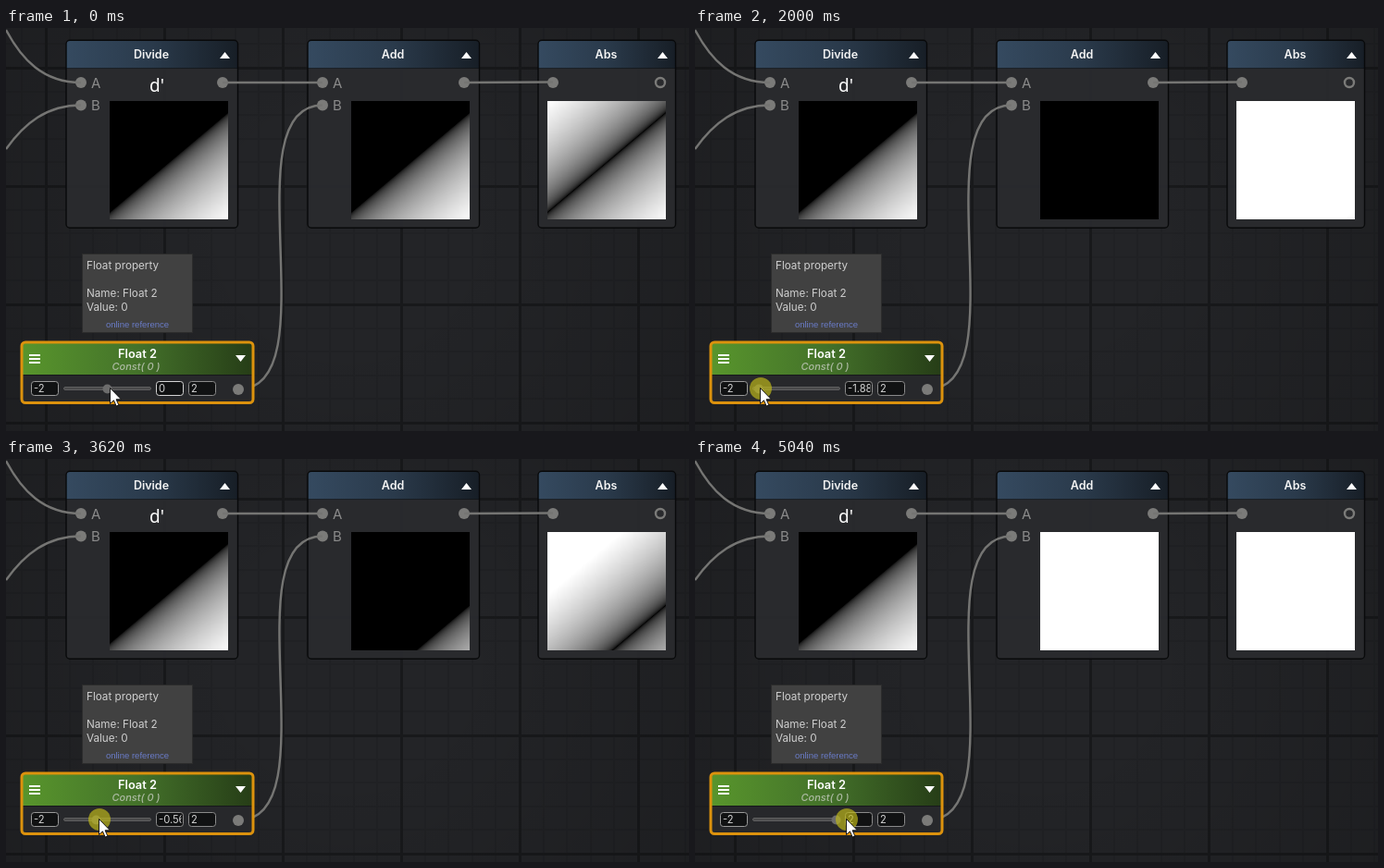
Write an HTML page with a canvas that moves like this. It is 738 by 436 pixels and loops after 5200 ms.

```html
<!DOCTYPE html>
<html lang="en">
<head>
<meta charset="utf-8">
<title>Node graph slider</title>
<style>
html, body { margin: 0; width: 100%; height: 100%; overflow: hidden; background: #202124; }
canvas { display: block; }
</style>
</head>
<body>
<canvas id="stage" width="738" height="436"></canvas>
<script>
const W = 738, H = 436, LOOP = 5200, SIZE = 128;
const ctx = document.getElementById('stage').getContext('2d');
const SANS = 'Inter, sans-serif';
const TITLE = '600 12.5px ' + SANS;
const GREY = '#7b7b79';

// Pointer path: [time, x]
const PATH = [
  [0, 113], [750, 113], [1150, 100], [1300, 93], [1840, 71.5], [1970, 71.5],
  [2000, 71], [2170, 64], [2300, 64], [2510, 59], [2800, 59], [3330, 88],
  [3620, 100.5], [3880, 110], [4140, 131], [4430, 149], [4800, 163],
  [5039, 163], [5040, 164]
];

function pointerAt(t) {
  const i = PATH.findIndex(p => p[0] > t);
  if (i < 0) return PATH[PATH.length - 1][1];
  const [t0, x0] = PATH[i - 1], [t1, x1] = PATH[i];
  return x0 + (x1 - x0) * (t - t0) / (t1 - t0);
}

// The slider moves in steps of 0.04 between -2 and 2.
function valueAt(x) {
  const v = Math.round((x - 112.6) / 22 / 0.04) * 0.04;
  return Math.max(-2, Math.min(2, v));
}

function roundBox(x, y, w, h, r, fill, stroke, line = 1, c = ctx) {
  c.beginPath();
  c.roundRect(x, y, w, h, r);
  if (fill) { c.fillStyle = fill; c.fill(); }
  if (stroke) { c.strokeStyle = stroke; c.lineWidth = line; c.stroke(); }
}

function text(str, x, y, font, color, align = 'left', c = ctx) {
  c.font = font;
  c.fillStyle = color;
  c.textAlign = align;
  c.fillText(str, x, y);
}

function poly(c, points, fill) {
  c.beginPath();
  points.forEach(([x, y]) => c.lineTo(x, y));
  c.closePath();
  c.fillStyle = fill;
  c.fill();
}

function dot(c, x, y, r, fill) {
  c.beginPath();
  c.arc(x, y, r, 0, Math.PI * 2);
  c.fillStyle = fill;
  c.fill();
}

function sweep(c, x0, x1, ...colors) {
  const g = c.createLinearGradient(x0, 0, x1, 0);
  colors.forEach((color, i) => g.addColorStop(i / (colors.length - 1), color));
  return g;
}

// Linear light to sRGB
function encode(level) {
  const l = Math.max(0, Math.min(1, level));
  return l < 0.0031308 ? 12.92 * l : 1.055 * Math.pow(l, 1 / 2.4) - 0.055;
}

function makePreview(x) {
  const canvas = document.createElement('canvas');
  canvas.width = canvas.height = SIZE;
  const c = canvas.getContext('2d');
  const image = c.createImageData(SIZE, SIZE);
  return {
    paint(fn) {
      for (let py = 0, i = 0; py < SIZE; py++) {
        for (let px = 0; px < SIZE; px++, i += 4) {
          const d = (0.844 * px / SIZE + py / SIZE - 0.935) / 0.93;
          const shade = 255 * encode(fn(d));
          image.data[i] = image.data[i + 1] = image.data[i + 2] = shade;
          image.data[i + 3] = 255;
        }
      }
      c.putImageData(image, 0, 0);
    },
    draw() { ctx.drawImage(canvas, x, 79); }
  };
}

function drawGrid(c) {
  c.fillStyle = '#232427';
  c.fillRect(0, 0, W, H);
  const line = (p, w, color) => {
    c.fillStyle = color;
    c.fillRect(p - w / 2, 0, w, H);
    c.fillRect(0, p - w / 2, W, w);
  };
  for (let p = 43 - 25.6; p < W; p += 25.6) line(Math.round(p), 2, '#202124');
  for (let p = 43; p < W; p += 128) line(p + 0.5, 3, '#18191b');
  const shade = c.createRadialGradient(W / 2, H / 2, 120, W / 2, H / 2, 430);
  shade.addColorStop(0, 'rgba(0,0,0,0)');
  shade.addColorStop(1, 'rgba(0,0,0,0.16)');
  c.fillStyle = shade;
  c.fillRect(0, 0, W, H);
}

function drawNode(c, x, w, title, inputs, outX) {
  roundBox(x, 13.5, w - 0.5, 203, 4, 'rgba(42,43,46,0.94)', null, 1, c);
  roundBox(x, 13.5, w - 0.5, 30.5, [4, 4, 0, 0], sweep(c, x, x + w, '#354a60', '#2a3a4b', '#171e26'), null, 1, c);
  c.fillStyle = 'rgba(18,19,21,0.7)';
  c.fillRect(x, 43, w, 1);
  roundBox(x, 13.25, w - 0.5, 203, 4, null, '#08090a', 1.4, c);
  text(title, x + w / 2 - 1, 33, TITLE, '#f4f4f4', 'center', c);
  const tip = x + w - 14.5;
  poly(c, [[tip - 5.5, 33], [tip, 26], [tip + 5.5, 33]], '#fff');
  inputs.forEach((label, i) => {
    text(label, x + 27, 65 + i * 24, '15px ' + SANS, '#8b8b8b', 'left', c);
    dot(c, x + 16, 59 + i * 24.5, 6, GREY);
  });
  if (outX) dot(c, outX, 59, 6, GREY);
}

function drawWires(c) {
  c.strokeStyle = '#757573';
  c.lineWidth = 2.4;
  const wires = [
    'M0 2C17 34 40 59 81 59', 'M0 131C20 103 44 83.5 81 83.5',
    'M234 59H342', 'M495 59L591 58.5', 'M251 391C352 391 241 83.5 342 83.5'
  ];
  wires.forEach(d => c.stroke(new Path2D(d)));
}

function drawTooltip(c) {
  c.fillStyle = '#414141';
  c.fillRect(83, 245, 118, 84);
  c.strokeStyle = '#2c2c2c';
  c.lineWidth = 1;
  c.strokeRect(82.5, 244.5, 119, 85);
  [['Float property', 261], ['Name: Float 2', 291], ['Value: 0', 306]].forEach(
    ([line, y]) => text(line, 87, y, '11.7px ' + SANS, '#cfcfcf', 'left', c));
  text('online reference', 142, 324, '9.5px "Liberation Sans", sans-serif', '#6a7cc8', 'center', c);
}

function drawProperty(c) {
  roundBox(17, 340, 250, 65.5, 4, '#27282b', null, 1, c);
  roundBox(18, 341, 248, 35, [3, 3, 0, 0], sweep(c, 18, 266, '#58952c', '#44722a', '#263d17'), null, 1, c);
  c.fillStyle = '#16181a';
  c.fillRect(18, 375, 248, 1);
  roundBox(17, 340, 250, 65.5, 4, null, '#dc920d', 3, c);
  text('Float 2', 142, 357, '600 12.8px ' + SANS, '#fff', 'center', c);
  text('Const( 0 )', 140.5, 370, 'italic 500 11px ' + SANS, '#adbba3', 'center', c);
  c.fillStyle = '#fff';
  [353, 357, 361].forEach(y => c.fillRect(25, y, 12, 2));
  poly(c, [[248, 354], [259, 354], [253.5, 361]], '#fff');
  dot(c, 251, 391, 6, GREY);
  roundBox(62.5, 388.5, 94, 3, 1.5, '#4a4a4b', '#5e5e5f', 1, c);
  drawField(c, 27, '-2', '#9a9a9a');
  drawField(c, 197, '2', '#8a8a8a');
}

function drawField(c, x, str, border) {
  roundBox(x + 0.5, 382.5, 29, 15, 3, '#111213', border, 1, c);
  c.save();
  c.beginPath();
  c.rect(x + 2, 384, 25.5, 13);
  c.clip();
  text(str, x + 3, 394, '11.2px ' + SANS, '#d2d2d2', 'left', c);
  c.restore();
}

function drawPointer(x) {
  const arrow = new Path2D('M0 0V16L3.7 12.6L6.3 18.4L8.8 17.3L6.2 11.6H11.2Z');
  ctx.save();
  ctx.translate(x - 0.5, 389.5);
  ctx.scale(1.06, 1.06);
  ctx.fillStyle = '#fff';
  ctx.fill(arrow);
  ctx.strokeStyle = '#111';
  ctx.lineWidth = 0.9;
  ctx.stroke(arrow);
  ctx.restore();
}

function makeBackdrop() {
  const canvas = document.createElement('canvas');
  canvas.width = W;
  canvas.height = H;
  const c = canvas.getContext('2d');
  drawGrid(c);
  drawNode(c, 65, 186, 'Divide', ['A', 'B'], 234);
  drawNode(c, 326, 186, 'Add', ['A', 'B'], 495);
  drawNode(c, 575, 149, 'Abs', ['']);
  drawWires(c);
  c.beginPath();
  c.arc(707, 59, 5, 0, Math.PI * 2);
  c.strokeStyle = GREY;
  c.lineWidth = 2.4;
  c.stroke();
  text("d'", 155, 69, '19px "Noto Sans", sans-serif', '#fff', 'left', c);
  drawTooltip(c);
  drawProperty(c);
  return canvas;
}

const backdrop = makeBackdrop();
const divide = makePreview(112), add = makePreview(373), abs = makePreview(585);
divide.paint(d => d);
let painted = null;

function draw(t) {
  const x = pointerAt(t), v = valueAt(x);
  if (v !== painted) {
    add.paint(d => d + v);
    abs.paint(d => Math.abs(d + v));
    painted = v;
  }
  ctx.drawImage(backdrop, 0, 0);
  [divide, add, abs].forEach(p => p.draw());

  const label = String(+v.toFixed(2) || 0);
  drawField(ctx, 162, label, t < 440 ? '#d4d4d4' : '#8a8a8a');
  dot(ctx, 109.5 + 21.5 * v, 390.5, 5, '#6c6c6c');

  const px = Math.round(x);
  const press = Math.max(0, Math.min(1, (t - 400) / 60));
  if (t >= 420) dot(ctx, px, 390, 12, `rgba(188,182,26,${0.69 * press})`);
  drawPointer(px);
}

const start = performance.now();
function tick() {
  draw((performance.now() - start) % LOOP);
  requestAnimationFrame(tick);
}
tick();
</script>
</body>
</html>
```
